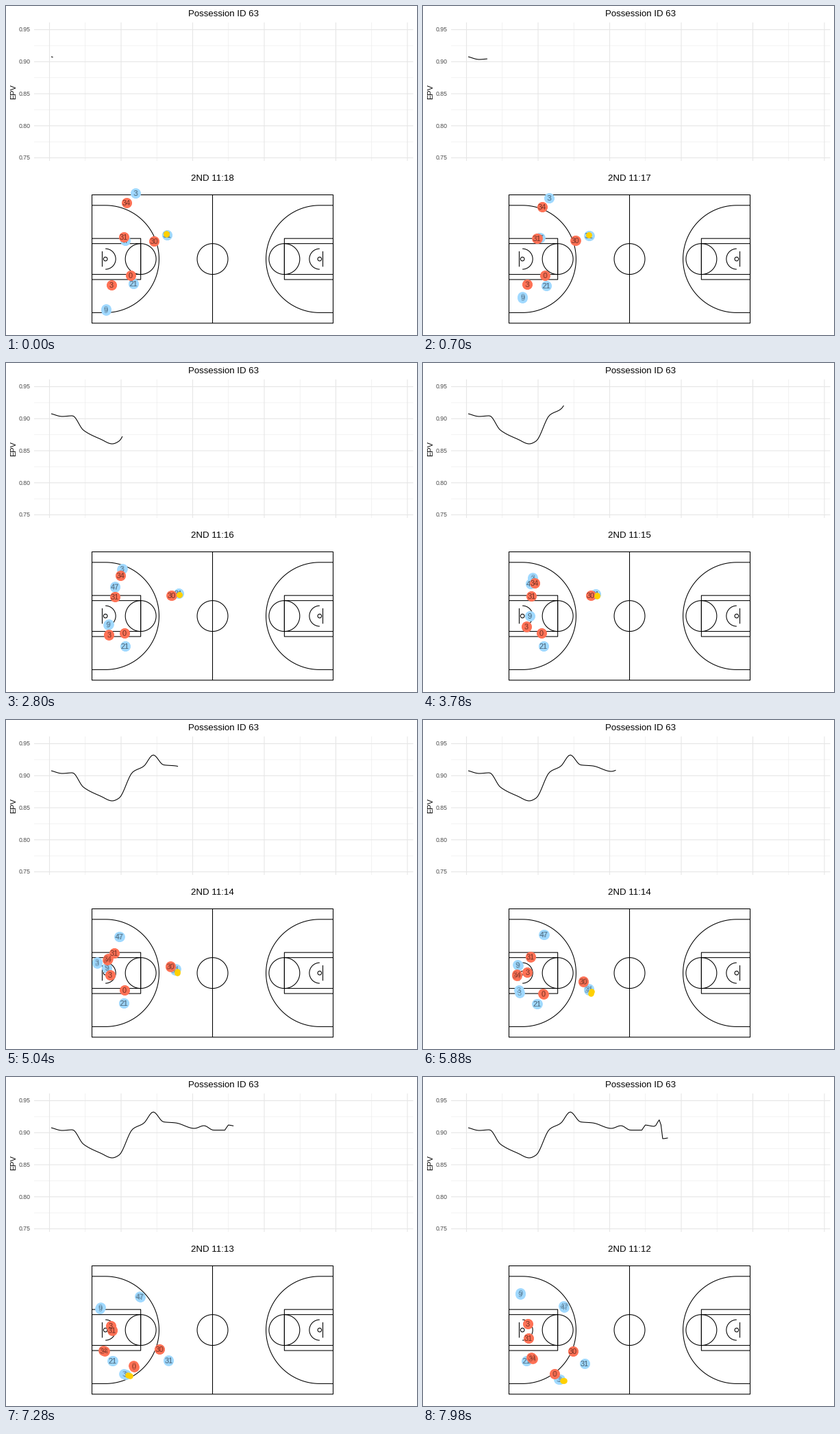
Recreate the animation shown at these times as a matplotlib script. Size 600 px wide and 480 px high, loop 8 s.

```python
import numpy as np
import matplotlib.pyplot as plt
from matplotlib.animation import FuncAnimation
from matplotlib.collections import LineCollection

plt.rcParams["font.family"] = "Liberation Sans"
W, H, DPI = 600, 480, 100
PX = 72 / DPI                        # one pixel in points
TICK, STEP, LOOP = 20, 140, 8000     # ms

BLUE, RED, GOLD = "#a0d9ff", "#ff7256", "#ffd000"
FT, LEFT, TOP = 3.745, 125.5, 275.5  # court scale and corner

# Key points of each run: (step, x, y).
AWAY = {
    "3": [(0, 189, 273), (27, 160, 314), (36, 133, 354), (47, 153, 424),
          (57, 199, 441)],
    "47": [(0, 174, 342), (27, 157, 322), (47, 186, 312), (57, 206, 335)],
    "9": [(0, 146, 443), (14, 144, 396), (27, 156, 369), (47, 135, 352),
          (57, 142, 316)],
    "21": [(0, 186, 405), (14, 172, 412), (27, 176, 413), (57, 151, 414)],
    "31": [(0, 235, 334), (14, 252, 336), (27, 252, 337), (47, 239, 408),
           (57, 236, 418)],
}
HOME = {
    "34": [(0, 176, 287), (27, 163, 321), (47, 133, 388), (57, 159, 410)],
    "31": [(0, 172, 337), (14, 159, 341), (36, 158, 340), (57, 154, 381)],
    "30": [(0, 216, 343), (27, 245, 339), (47, 229, 393), (57, 219, 400)],
    "0": [(0, 182, 393), (14, 173, 394), (36, 173, 394), (57, 192, 433)],
    "3": [(0, 154, 407), (14, 150, 403), (36, 152, 372), (57, 153, 360)],
}
EPV = [(66, 74), (82, 78), (97, 77), (113, 98), (139, 111.5), (155, 118),
       (165, 114), (185, 76), (201, 67.5), (215, 51), (230, 65.5),
       (248, 67), (275, 75), (289, 71), (303, 77.5), (321, 77.5), (323, 70),
       (338, 72), (346, 62), (350, 90), (357, 89)]


def spline(points, t):
    """Smooth curve through (t, value...) points without overshoot."""
    p = np.array(points, float)
    ts, v = p[:, 0], p[:, 1:]
    d = np.diff(v, axis=0) / np.diff(ts)[:, None]
    prod, total = d[1:] * d[:-1], d[1:] + d[:-1]
    inner = np.where(prod > 0, 2 * prod / np.where(prod > 0, total, 1), 0)
    m = np.vstack([d[:1], inner, d[-1:]])
    i = np.clip(np.searchsorted(ts, t, "right") - 1, 0, len(ts) - 2)
    h = (ts[i + 1] - ts[i])[:, None]
    u = (t - ts[i])[:, None] / h
    return ((1 + 2 * u) * (1 - u) ** 2 * v[i] + u * (1 - u) ** 2 * h * m[i]
            + u * u * (3 - 2 * u) * v[i + 1] + u * u * (u - 1) * h * m[i + 1])


def ball_path(t):
    """Dribbled by 31, then passed to 3."""
    t = t[:, None]
    dribble = spline(AWAY["31"], t[:, 0]) + t * (0.1, 0.15) - (1, 1.5)
    catch = spline(AWAY["3"], t[:, 0]) + (6, 2)
    w = np.clip((t - 46) / 4, 0, 1)
    return dribble * (1 - w) + catch * w


def arc(cx, cy, r, a=-180, b=180):
    th = np.radians(np.linspace(a, b, 90))
    return np.column_stack([cx + r * np.cos(th), cy + r * np.sin(th)])


def rect(x0, y0, x1, y1):
    return np.array([(x0, y0), (x1, y0), (x1, y1), (x0, y1), (x0, y0)])


def court():
    """Court lines in feet, turned into pixels."""
    three = np.vstack([[(0, 4.1)], arc(5.25, 25, 20.9, -90, 90), [(0, 45.9)]])
    half = [three, rect(0, 17, 19, 33), rect(0, 19, 19, 31),
            arc(19, 25, 6), arc(5.25, 25, 0.75), arc(5.25, 25, 4, -90, 90),
            np.array([(4, 22), (4, 28)])]
    far = [s * (-1, 1) + (94, 0) for s in half]
    mid = [rect(0, 0, 94, 50), np.array([(47, 0), (47, 50)]), arc(47, 25, 6)]
    return [s * FT + (LEFT, TOP) for s in half + far + mid]


fig = plt.figure(figsize=(W / DPI, H / DPI), dpi=DPI, facecolor="white")
ax = fig.add_axes([0, 0, 1, 1])
ax.set(xlim=(0, W), ylim=(H, 0))
ax.axis("off")


def lines(segs, color, width, z):
    ax.add_collection(LineCollection(segs, colors=color, linewidths=width * PX,
                                     snap=False, zorder=z), autolim=False)


def label(x, y, s, size, **kw):
    kw = {"ha": "center", "va": "baseline", "color": "black", **kw}
    return ax.text(x, y, s, fontsize=size * PX, **kw)


def grid(x0, y0, nx, ny):
    cols = [[(x0 + 104.5 * i, 24), (x0 + 104.5 * i, 226)] for i in range(nx)]
    rows = [[(41, y0 + 46.75 * i), (594.5, y0 + 46.75 * i)] for i in range(ny)]
    return cols + rows


lines(grid(115.75, 57.9, 5, 4), "#ebebeb", 0.6, 1)
lines(grid(63.5, 34.5, 6, 5), "#e6e6e6", 1.1, 1)
for i in range(5):
    label(36, 37.4 + 46.75 * i, f"{0.95 - 0.05 * i:.2f}", 8.8,
          ha="right", color="#4d4d4d")
label(317.5, 15, "Possession ID 63", 13.2)
label(11.3, 125, "EPV", 11, rotation=90, va="center")
clock = label(301, 255.3, "", 13.2)
lines(court(), "black", 1.07, 2)
trace, = ax.plot([], [], color="black", lw=1.07 * PX, zorder=3,
                 solid_capstyle="butt")


def dots(color, size, z):
    return ax.scatter([], [], s=(size * PX) ** 2, c=color, linewidths=0,
                      zorder=z)


def team(players, color, z):
    tags = [label(0, 0, n, 11, alpha=0.32, zorder=z + 1)
            for n in players for _ in range(2)]
    return list(players.values()), dots(color, 14.8, z), tags


teams = [team(AWAY, BLUE, 4), team(HOME, RED, 6)]
ball = dots(GOLD, 8.6, 8)


def update(i):
    k = i * TICK // STEP
    xs = 66 + 2.535 * np.arange(2 * k + 2)
    trace.set_data(xs, spline(EPV, xs)[:, 0])
    clock.set_text(f"2ND 11:{18 - (k + 5) // 10}")
    pair = np.array([k - 0.25, k + 0.25])   # two tracked moments per step
    for paths, marks, tags in teams:
        spots = np.vstack([spline(p, pair) for p in paths])
        marks.set_offsets(spots)
        for tag, (x, y) in zip(tags, spots):
            tag.set_position((x, y + 4))
    ball.set_offsets(ball_path(pair))
    return []


anim = FuncAnimation(fig, update, frames=LOOP // TICK, interval=TICK,
                     repeat=True, repeat_delay=0, cache_frame_data=False)
plt.show()
```
